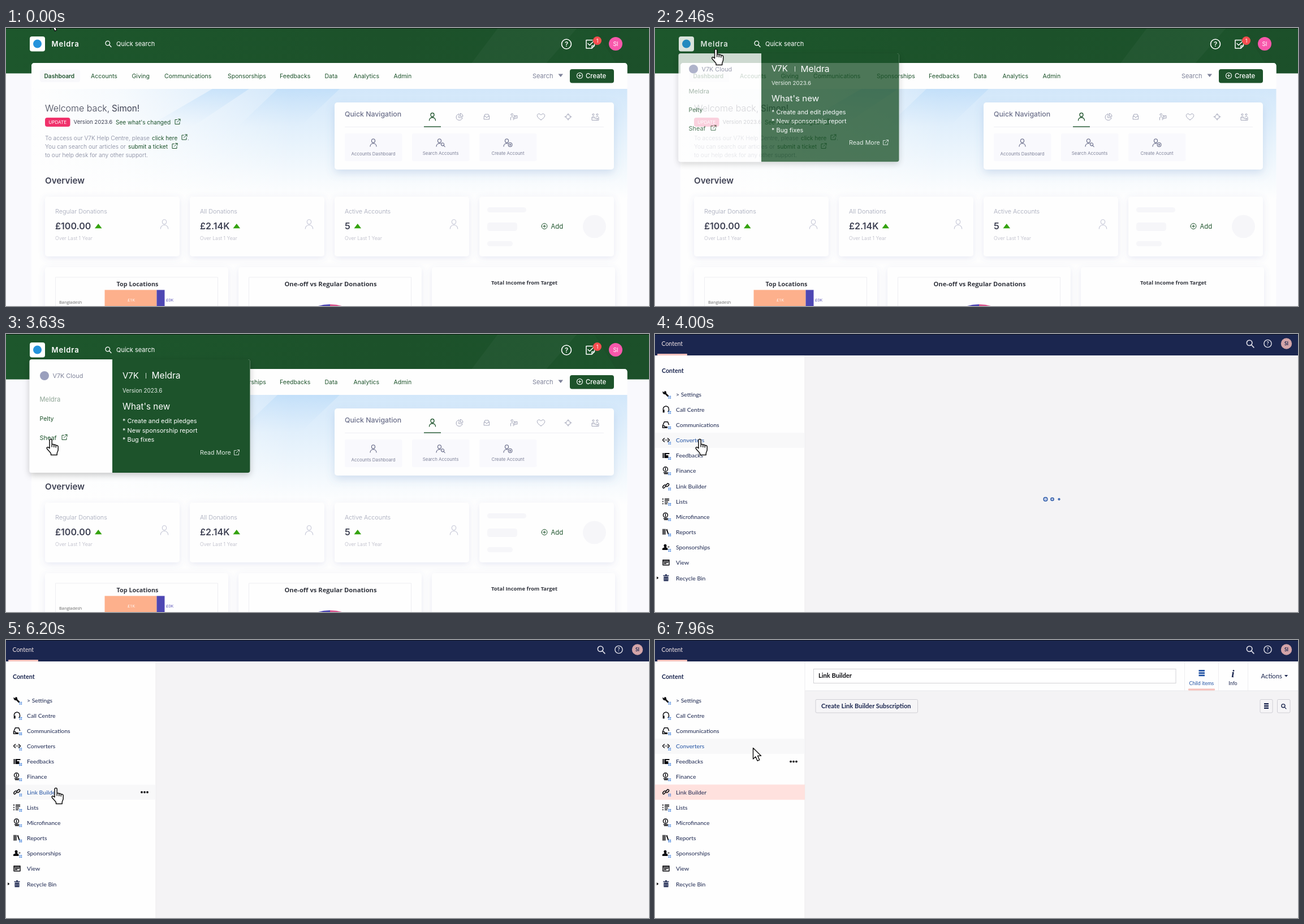
Animation, 1137 px wide and 493 px high, one loop 8 s. Source, as an HTML page:

```html
<!DOCTYPE html>
<html lang="en">
<head>
<meta charset="utf-8">
<title>Dashboard to link builder</title>
<style>
html, body { margin: 0; width: 100%; height: 100%; overflow: hidden; background: #f9f9fd; }
svg { display: block; width: 1137px; height: 493px; }
text { white-space: pre; }
#dash, #popup { font-family: Poppins, Inter, sans-serif; }
#cms { font-family: Lato, sans-serif; }
</style>
</head>
<body>
<svg id="stage" viewBox="0 0 1137 493" xmlns="http://www.w3.org/2000/svg">
  <defs>
    <linearGradient id="green"><stop stop-color="#1d572c"/><stop offset=".6" stop-color="#1c512a"/><stop offset="1" stop-color="#1d542c"/></linearGradient>
    <linearGradient id="sky" x2="0" y2="1"><stop stop-color="#d2e7fa"/><stop offset=".5" stop-color="#e8f3fc"/><stop offset="1" stop-color="#fefefe"/></linearGradient>
    <linearGradient id="veil"><stop stop-color="#fefefe"/><stop offset=".35" stop-color="#fefefe" stop-opacity=".8"/><stop offset="1" stop-color="#fefefe" stop-opacity="0"/></linearGradient>
    <linearGradient id="ray" x2="0" y2="1"><stop stop-color="#b9dbf9" stop-opacity=".6"/><stop offset="1" stop-color="#cfe5fa" stop-opacity="0"/></linearGradient>
    <filter id="soft" x="-10%" y="-20%" width="120%" height="150%"><feDropShadow dx="0" dy="3" stdDeviation="6" flood-color="#5a6bb0" flood-opacity=".14"/></filter>
    <filter id="deep" x="-10%" y="-20%" width="120%" height="150%"><feDropShadow dx="0" dy="6" stdDeviation="8" flood-color="#5580bd" flood-opacity=".22"/></filter>
    <filter id="drop" x="-10%" y="-20%" width="120%" height="150%"><feDropShadow dx="0" dy="4" stdDeviation="6" flood-color="#000" flood-opacity=".22"/></filter>
  </defs>
  <g id="dash"></g>
  <g id="popup"></g>
  <g id="cms"></g>
  <g id="cursor" fill="#fff" stroke="#111" stroke-linejoin="round" stroke-linecap="round">
    <path id="arrow" stroke-width="1.4" d="M.5 .5V20L4.8 15.9 8.1 23.3 11.8 21.7 8.6 14.4H14.6Z"/>
    <path id="hand" stroke-width="1.5" d="M-2 12V2.5a2.1 2.1 0 0 1 4.2 0V10c1-.9 3.2-.6 3.6.6 1.2-.8 3-.3 3.4 1 1.6-.6 4 .2 4 2.4v5c0 3-2 4.4-2 7v2.4H.5V26C-.8 23.5-7 18-7 16.2c0-1.8 2.5-2 3.6-.8L-2 16.8ZM2.2 10v4M5.8 10.8V14.4M9.2 11.8V15"/>
  </g>
</svg>
<script>
const $ = id => document.getElementById(id);
const LOOP = 8000, PAGE_AT = 3760;
const BRAND = 'Meldra', FIRM = 'V7K', USER = 'Simon', INITIALS = 'SI';
const GREEN = '#1d532b', INK = '#3f4254', GREY = '#7e8299', PALE = '#b5b5c3', NAVY = '#1b264f', BLUE = '#2152a3';

// Text placed by the middle of its capitals.
const text = (x, y, size, str, fill, weight = 400, more = '') =>
  `<text x="${x}" y="${y + size * .36}" font-size="${size}" fill="${fill}" font-weight="${weight}" ${more}>${str}</text>`;
const MID = 'text-anchor="middle"';
const rect = (x, y, w, h, fill, r = 0, more = '') =>
  `<rect x="${x}" y="${y}" width="${w}" height="${h}" rx="${r}" fill="${fill}" ${more}/>`;
const circle = (x, y, r, fill, more = '') => `<circle cx="${x}" cy="${y}" r="${r}" fill="${fill}" ${more}/>`;
const shape = (d, fill) => `<path d="${d}" fill="${fill}"/>`;
const line = (x, y, d, color, w = 1) =>
  `<path transform="translate(${x} ${y})" d="${d}" fill="none" stroke="${color}" stroke-width="${w}" stroke-linecap="round" stroke-linejoin="round"/>`;

const PERSON = 'M-3 -3.4a3 3.4 0 1 0 6 0a3 3.4 0 1 0 -6 0M-5.5 6.5c0-7 11-7 11 0';
const OUT = 'M-1 -3.5H-4.5V4.5H3.5V1M1 -4.5H4.5V-1M4.5 -4.5L-1 1';
const LENS = 'M-4.5 -1a3.8 3.8 0 1 0 7.6 0a3.8 3.8 0 1 0 -7.6 0M2.2 2L5.5 5.5';
const PLUS = 'M-5 0a5 5 0 1 0 10 0a5 5 0 1 0 -10 0M-2.3 0H2.3M0 -2.3V2.3';

function drawDash() {
  let s = rect(0, 0, 1137, 493, '#f9f9fd') + rect(0, 0, 1137, 80.5, 'url(#green)');
  s += shape('M870 0H1010L940 80H810Z', 'rgba(255,255,255,.03)') + shape('M1040 0H1137V80H1090Z', 'rgba(0,0,0,.05)')
    + rect(0, 0, 1137, 1, '#0b1a10');
  s += rect(45, 62, 1053.5, 440, '#fefefe', 5);
  s += rect(45, 108, 1053.5, 195, 'url(#sky)') + rect(45, 108, 460, 195, 'url(#veil)');
  s += shape('M365 108H430L330 175H250Z', 'url(#ray)') + shape('M480 108H590L520 175H410Z', 'url(#ray)');
  s += rect(45, 62, 1053.5, 46, '#fefefe', 5);

  s += `<g id="brand">${rect(42, 15, 27, 26.5, '#fff', 4)}${circle(55.5, 28, 7.5, '#2493dc')}`
    + text(80.5, 28, 13, BRAND, '#fff', 600, 'letter-spacing=".9"') + '</g>';
  s += line(180.5, 28, LENS, '#fff', 1.3) + text(195, 28, 11, 'Quick search', '#fff');
  s += circle(991, 28.5, 8.5, 'none', 'stroke="#fff" stroke-width="1.6"') + text(991, 28.5, 11.5, '?', '#fff', 600, MID);
  s += line(1033, 28.5, 'M4 -7H-7V7.5H3L7.5 3V0M-4 -1L-1 2L6 -5M3 7V3H7', '#fff', 1.5);
  s += circle(1045.5, 22.5, 7.5, '#f64e50') + text(1045.5, 22.5, 9, '1', '#fff', 400, MID);
  s += circle(1078, 28, 12, '#f858ab') + text(1078, 28, 10, INITIALS, '#fff', 400, MID);

  s += rect(60, 74, 71, 22, '#f8f8fb', 4) + text(67.5, 85, 10.2, 'Dashboard', GREEN, 600);
  [['Accounts', 150], ['Giving', 222.5], ['Communications', 280], ['Sponsorships', 392], ['Feedbacks', 484],
   ['Data', 563.5], ['Analytics', 614.5], ['Admin', 685.5]].forEach(([n, x]) => s += text(x, 85, 10.5, n, GREEN));
  s += text(931, 85, 11, 'Search', GREY) + shape('M976.5 81.5H985L980.8 87Z', GREY);
  s += rect(997, 73, 78, 24.5, GREEN, 4) + line(1014.5, 84.5, PLUS, '#fff', 1.1) + text(1025, 85, 11.4, 'Create', '#fff', 500);

  s += text(69, 142.5, 16, 'Welcome back, ', INK, 300) + text(187, 142.5, 15.2, USER + '!', INK);
  s += rect(69, 159, 44.5, 16, '#f0316b', 4) + text(91.2, 167.3, 8.2, 'UPDATE', '#fff', 400, MID);
  s += text(119.5, 167, 9.6, 'Version 2023.6', INK) + text(194, 167, 10.1, 'See what\'s changed', GREEN) + line(303.5, 166, OUT, GREEN);
  s += text(69, 195, 10.2, `To access our ${FIRM} Help Centre, please`, GREY, 300) + text(258, 195, 9.9, 'click here', GREEN)
    + line(315.5, 193.5, OUT, GREEN) + text(321, 195, 10, '.', GREY);
  s += text(69, 210, 10.3, 'You can search our articles or', GREY, 300) + text(216, 210, 10.2, 'submit a ticket', GREEN) + line(298.5, 209, OUT, GREEN);
  s += text(69, 225, 10.2, 'to our help desk for any other support.', GREY, 300);
  s += text(69, 271, 15.2, 'Overview', INK, 600);

  s += rect(581, 132, 494, 119, '#fefefe', 5, 'filter="url(#deep)"') + text(599, 153, 12.3, 'Quick Navigation', '#6b6f8a', 500);
  s += rect(599, 175, 458, 1, '#eeeef4') + rect(739, 174.4, 30, 1.4, GREEN);
  s += line(754, 157.5, PERSON, GREEN, 1.3);
  ['M-1 -5a5.5 5.5 0 1 0 6 6.5H-1ZM1.5 -6V-.8H6A5.5 5.5 0 0 0 1.5 -6',
   'M-4.5 -1L-3 -4.5H3L4.5 -1V4.5H-4.5ZM-4.5 -1H-2L-1 1H1L2 -1H4.5',
   'M-5 -4a1.8 1.8 0 1 0 3.6 0a1.8 1.8 0 1 0 -3.6 0M-5.5 5.5V1Q-3 -2 -.8 1V5.5M0 -2H6V2.5H3L1 4V-2M2 0H4',
   'M0 5.5C-13 -2 -4 -9 0 -3.2C4 -9 13 -2 0 5.5',
   'M-4 0a4 4 0 1 0 8 0a4 4 0 1 0 -8 0M0 -6V-3M0 6V3M-6 0H-3M6 0H3',
   'M-5 -4a1.5 1.5 0 1 0 3 0a1.5 1.5 0 1 0 -3 0M2 -4a1.5 1.5 0 1 0 3 0a1.5 1.5 0 1 0 -3 0M-6 1Q-3.5 -3 -1 1M1 1Q3.5 -3 6 1V6H2M-6 2V6H2L5 3H0L-2 1.5H-6']
    .forEach((d, i) => s += line(802 + 48 * i, 157.5, d, '#9a9db3', .9));
  ['Accounts Dashboard', 'Search Accounts', 'Create Account'].forEach((n, i) => {
    const x = 649.5 + 119 * i, p = i ? x - 2 : x;
    s += rect(x - 50.5, 187, 101.5, 49, '#f9f9fd', 3) + line(p, 203.5, PERSON, '#5d6180', 1.1);
    if (i) s += circle(x + 4, 207, 4.5, '#f9f9fd') + `<g transform="translate(${x + 4} 207) scale(.68)">${line(0, 0, i == 1 ? LENS : PLUS, '#5d6180', 1.5)}</g>`;
    s += text(x, i ? 222 : 223, 7.9, n, GREY, 400, MID);
  });

  [['Regular Donations', '£100.00', 157], ['All Donations', '£2.14K', 401.5], ['Active Accounts', '5', 615.5]].forEach(([n, v, ax], i) => {
    const x = 69 + 256 * i;
    s += rect(x, 299, 238, 106, '#fefefe', 5, 'filter="url(#soft)"') + text(x + 18, 325, 10.8, n, '#a1a5b7', 300)
      + text(x + 18, 351, 16, v, INK, 600) + shape(`M${ax} 355.3L${ax + 6.3} 347L${ax + 12.6} 355.3Z`, '#35a30f')
      + text(x + 18, 373, 8.8, 'Over Last 1 Year', PALE, 300)
      + `<g transform="translate(${x + 211} 348) scale(1.22)">${line(0, 0, PERSON, '#c4c6d6', .9)}</g>`;
  });
  s += rect(837, 299, 238, 106, '#fefefe', 5, 'filter="url(#soft)"');
  [[318, 69, 9], [345, 53, 15], [378, 45, 9]].forEach(([y, w, h]) => s += rect(851, y, w, h, '#f6f6f9', 4.5));
  s += circle(1040.5, 352, 20.5, '#f6f6f9') + line(952, 351.5, PLUS, GREEN) + text(963.5, 351.5, 11.3, 'Add', GREEN);

  [69, 411, 753].forEach(x => s += rect(x, 424, 324, 90, '#fefefe', 5, 'filter="url(#soft)"'));
  [87, 429].forEach(x => s += line(x, 442, 'M.5 60V0H287.5V60', '#eeeef2'));
  const title = (x, y, size, str) => text(x, y, size, str, '#33363f', 700, `${MID} font-family="Open Sans, sans-serif"`);
  s += title(232.5, 454, 10.8, 'Top Locations') + title(574, 454, 11.2, 'One-off vs Regular Donations') + title(916.5, 451.5, 9.4, 'Total Income from Target');
  const tiny = (x, y, str, fill) => text(x, y, 7.4, str, fill, 400, 'font-family="Open Sans, sans-serif"');
  s += rect(174.5, 464.5, 92, 30, '#fdb08c') + rect(266.5, 464.5, 14, 30, '#4e47b3');
  s += tiny(94, 486, 'Bangladesh', '#666') + tiny(215, 482, '£1K', '#fff') + tiny(283, 482, '£0K', '#4e47b3');
  s += shape('M573 490A67 67 0 0 0 530 505H573Z', '#4e47b3') + shape('M573 490A67 67 0 0 1 616 505H573Z', '#d9568f');
  $('dash').innerHTML = s;
}

function drawPopup() {
  let s = rect(41.5, 45, 390, 201, '#fefefe', 4, 'filter="url(#drop)"') + shape('M188 45H427.5a4 4 0 0 1 4 4V242a4 4 0 0 1 -4 4H188Z', GREEN);
  s += circle(68, 74, 8, '#9a9fbd') + text(82.5, 74.5, 10.8, FIRM + ' Cloud', GREY);
  s += text(59.5, 115.5, 11.2, BRAND, '#8fa596') + text(59.5, 150, 10.5, 'Pelty', GREEN) + text(59.5, 184, 10.9, 'Sheaf', GREEN) + line(103.5, 183, OUT, GREEN);
  s += text(206, 73.5, 15, FIRM, '#fff') + rect(247, 69, 1, 10, '#cfdcd2') + text(257.5, 73.5, 15.6, BRAND, '#fff');
  s += text(206, 100, 9.8, 'Version 2023.6', '#e6eee8') + text(206, 128.5, 15.2, 'What\'s new', '#fff');
  ['Create and edit pledges', 'New sponsorship report', 'Bug fixes'].forEach((n, i) => s += text(206, 154.5 + 16.4 * i, 10.9, '* ' + n, '#fff'));
  s += text(343, 210.5, 10.7, 'Read More', '#dfe9e2') + line(408, 210, OUT, '#dfe9e2', .9);
  $('popup').innerHTML = s;
}

// Sidebar rows: label, icon outline, filled or stroked.
const COIN = 'M-5 -2.5a4 4 0 1 0 8 0a4 4 0 1 0 -8 0M-1 -4.5V-.5M-4 3.5H3M-3 5.5H3';
const ROWS = [
  ['&gt; Settings', 'M-6 -5L-3.5 -3L-2.5 -5.5C0 -5.5 1 -3.5 .5 -1.5L5 3L3 5L-1.5 .5C-4 1 -6 -1 -6 -3Z', 1],
  ['Call Centre', 'M-5 2C-7 -8 6 -8 5 1M-5 1V5M-3.5 1V5M5 0V2L3.5 4'],
  ['Communications', 'M-6 2L-3 -5H3L5 0M-6 2H-3L-2 4H2M-6 2V5.5H2'],
  ['Converters', 'M-3 -3L-6 0L-3 3M3 -3L6 0L3 3M-2 0H-1.8M.2 0H.4M2.2 0H2.4'],
  ['Feedbacks', 'M-6 -4H-4V5H-6ZM-3 -4H6V-2H0V0H4V5H-3Z', 1],
  ['Finance', COIN],
  ['Link Builder', 'M-1 1L-4 4.2Q-6.5 3.5 -5.5 1L-3 -1.5Q-1 -2.5 0 -.5M0 -1.5L3 -4.5Q6 -4 5 -1.5L2.5 1Q.5 2 -.5 0'],
  ['Lists', 'M-5.5 -4.5V-3M-5.5 0V1M-5.5 4V5M-2 -4H5M-2 -1.5H5M-2 1.5H3M-2 4.5H2'],
  ['Microfinance', COIN],
  ['Reports', 'M-6 -5H-4V5H-6ZM-3 -5H-1V5H-3ZM0 -4L2 -5L5 4L3.5 5Z', 1],
  ['Sponsorships', 'M-4 -2.5a2.5 2.8 0 1 1 5 0L.5 .5L3 2V5H-6.5V2L-3 .5ZM3 -1H6V0H3ZM4 -2H5V1H4Z', 1],
  ['View', 'M-5.5 -4.5H5.5V4.5H-5.5ZM-5.5 -2.5H5.5M-3.5 0H3.5M-3.5 2.2H0'],
  ['Recycle Bin', 'M-5 -4.5H-1.5V-6H1.5V-4.5H5V-3H-5ZM-4 -2H4V6H-4ZM-2 -.5V4.5H-1.2V-.5ZM1.2 -.5V4.5H2V-.5Z', 1]
];
const STEP = 27.15, FIRST = 107, LINK_ROW = 6;
const rowY = i => FIRST + STEP * i;
const rowAt = y => Math.floor((y - FIRST) / STEP + .5);

function drawCms() {
  let s = rect(0, 0, 1137, 493, '#f4f3f5') + rect(0, 38, 265, 455, '#fefefe') + rect(264.5, 38, 1, 455, '#ecebee');
  s += rect(0, 0, 1137, 38, NAVY) + rect(0, 0, 1137, 1, '#0b1020') + text(11.5, 17, 10.5, 'Content', '#f3e6e6');
  s += rect(4, 35, 53, 3, '#f5c1bc', 1) + text(12, 65, 10.7, 'Content', NAVY, 700);
  s += `<g transform="translate(1052 17) scale(1.25)">${line(0, 0, LENS, '#e3e2ea', 1.3)}</g>`;
  s += circle(1083.5, 17, 6.6, 'none', 'stroke="#e3e2ea" stroke-width="1.4"') + text(1083.5, 17, 9.5, '?', '#e3e2ea', 700, MID);
  s += circle(1116.5, 17, 9.7, '#d3a4a8') + text(1116.5, 17, 8.5, INITIALS, NAVY, 700, MID);
  s += rect(0, 0, 264.5, 26.5, '#f8f8f9', 0, 'id="hover"') + rect(0, rowY(LINK_ROW) - 13.5, 265, 27, '#ffe1de', 0, 'id="picked"');
  ROWS.forEach(([name, d, filled], i) => {
    const y = rowY(i), ink = i == 12 ? NAVY : '#0c0c10';
    s += filled ? `<path transform="translate(19.5 ${y - .5})" d="${d}" fill="${ink}" fill-rule="evenodd"/>` : line(19.5, y - .5, d, ink, 1.5);
    if (i < 11) {
      for (let k = 0; k < 4; k++) s += rect(23.5 + 2.8 * (k % 2), y + 2.7 + 2.8 * (k >> 1), 1.9, 1.9, '#3f7fdb', .4);
    }
    s += text(37, y, 10.4, name, NAVY, 400, 'class="label"');
  });
  s += shape('M3 430L6.5 432.5L3 435Z', '#111');
  s += '<g id="dots">' + [240, 245, 250].map(x => circle(x, 0, 1.9, '#0c0c10')).join('') + '</g>';
  s += '<g id="loader">' + [690.5, 702.5, 714.5].map(x => circle(x, 293, 2, '#b9c6e6', `stroke="${BLUE}" stroke-width="1.3"`)).join('') + '</g>';

  s += '<g id="editor">' + rect(265.5, 38, 872, 52, '#fefefe') + rect(265.5, 89.5, 872, 1, '#e9e9eb');
  s += rect(280.5, 51.5, 640.5, 25, '#fff', 0, 'stroke="#d3d2d6"') + text(289, 63, 11.1, 'Link Builder', '#0c0c10', 700);
  [936, 996, 1048].forEach(x => s += rect(x, 38, 1, 52, '#eeedf0'));
  [53, 57.2, 61.4].forEach(y => s += rect(961.5, y, 10.5, 2.8, BLUE));
  s += text(966.3, 76.5, 8.9, 'Child items', BLUE, 400, MID) + rect(943, 86.3, 47, 3.2, '#f5c1bc', 1);
  s += text(1022, 59, 19, 'i', NAVY, 700, `${MID} font-style="italic" font-family="Liberation Serif, serif"`) + text(1022, 76.5, 8.9, 'Info', NAVY, 400, MID);
  s += `<g id="actions">${text(1071.5, 63.5, 11.3, 'Actions', NAVY)}${shape('M1113 62H1119.2L1116.1 65.5Z', NAVY)}</g></g>`;

  const button = (x, w) => rect(x, 105.5, w, 23.5, '#f6f5f7', 2, 'stroke="#cfced4"');
  s += '<g id="tools">' + button(284, 180.5) + text(294, 117.3, 11.1, 'Create Link Builder Subscription', NAVY, 700) + button(1070, 22) + button(1100.5, 22.5);
  [112, 115.8, 119.6].forEach(y => s += rect(1077, y, 8, 2.4, NAVY));
  s += `<g transform="translate(1111.5 117.5) scale(.8)">${line(0, 0, LENS, NAVY, 1.7)}</g></g>`;
  $('cms').innerHTML = s;
}

const ramp = (t, a, b) => Math.min(1, Math.max(0, (t - a) / (b - a)));
const smooth = u => u * u * (3 - 2 * u);

// Pointer sweeps: start, end, then a quadratic curve.
const SWEEPS = [
  [20, 200, 78, -18, 125, 60, 133, 136],
  [560, 1000, 133, 136, 230, 100, 111, 57],
  [1460, 1750, 111, 57, 110, 48, 107.5, 37],
  [2750, 3130, 107.5, 37, 95, 110, 79, 186],
  [5500, 6200, 79, 186, 86, 225, 88, 262],
  [7630, 7960, 88, 262, 130, 240, 173, 191]
];
function pointer(t) {
  const [a, b, x0, y0, cx, cy, x1, y1] = SWEEPS.filter(m => m[0] <= t).pop() || SWEEPS[0];
  const u = smooth(ramp(t, a, b)), v = 1 - u;
  const mix = (p, c, q) => v * v * p + 2 * u * v * c + u * u * q;
  return [mix(x0, cx, x1), mix(y0, cy, y1)];
}
const isHand = t => t > 1560 && t < 2800 || t >= 3160 && t < 7710;

// cubic-bezier(.23, 1, .32, 1)
function easeOut(x) {
  let lo = 0, hi = 1;
  for (let i = 0; i < 20; i++) {
    const s = (lo + hi) / 2, r = 1 - s;
    if (.69 * s * r * r + .96 * s * s * r + s ** 3 < x) lo = s; else hi = s;
  }
  return 1 - (1 - lo) ** 3;
}

const show = (id, on) => $(id).style.display = on ? '' : 'none';
let labels, bullets;

function render(t) {
  const [x, y] = pointer(t), cms = t >= PAGE_AT;
  show('dash', !cms);
  show('cms', cms);
  show('popup', !cms && t >= 2410);
  show('hand', isHand(t));
  show('arrow', !isHand(t));
  $('cursor').setAttribute('transform', `translate(${x} ${y})`);

  if (!cms) {
    $('brand').setAttribute('opacity', 1 - .16 * (ramp(t, 1560, 1860) - ramp(t, 2780, 2980)));
    const p = easeOut(ramp(t, 2410, 2610));
    $('popup').setAttribute('opacity', p);
    $('popup').setAttribute('transform', `translate(0 45) scale(1 ${.8 + .2 * p}) translate(0 -45)`);
    return;
  }
  const row = rowAt(y), picked = t >= 6760;
  $('hover').setAttribute('y', rowY(row) - 13.3);
  labels.forEach((el, i) => el.setAttribute('fill', i == row && !(picked && i == LINK_ROW) ? BLUE : NAVY));
  show('picked', picked);
  show('dots', t > 4150);
  $('dots').setAttribute('transform', `translate(0 ${rowY(rowAt(pointer(t - 80)[1]))})`);
  show('loader', t < 4630 || t >= 6800 && t < 7000);
  bullets.forEach((el, i) => el.setAttribute('r', 1.2 + 1.1 * (1 + Math.cos(2 * Math.PI * ((t - 4000) / 900 - i * .2)))));
  show('editor', t >= 7000);
  $('actions').setAttribute('opacity', t < 7360 ? .6 : 1);
  show('tools', t >= 7640);
}

drawDash();
drawPopup();
drawCms();
labels = document.querySelectorAll('.label');
bullets = document.querySelectorAll('#loader circle');
const start = performance.now();
function tick() {
  render((performance.now() - start) % LOOP);
  requestAnimationFrame(tick);
}
tick();
</script>
</body>
</html>
```
